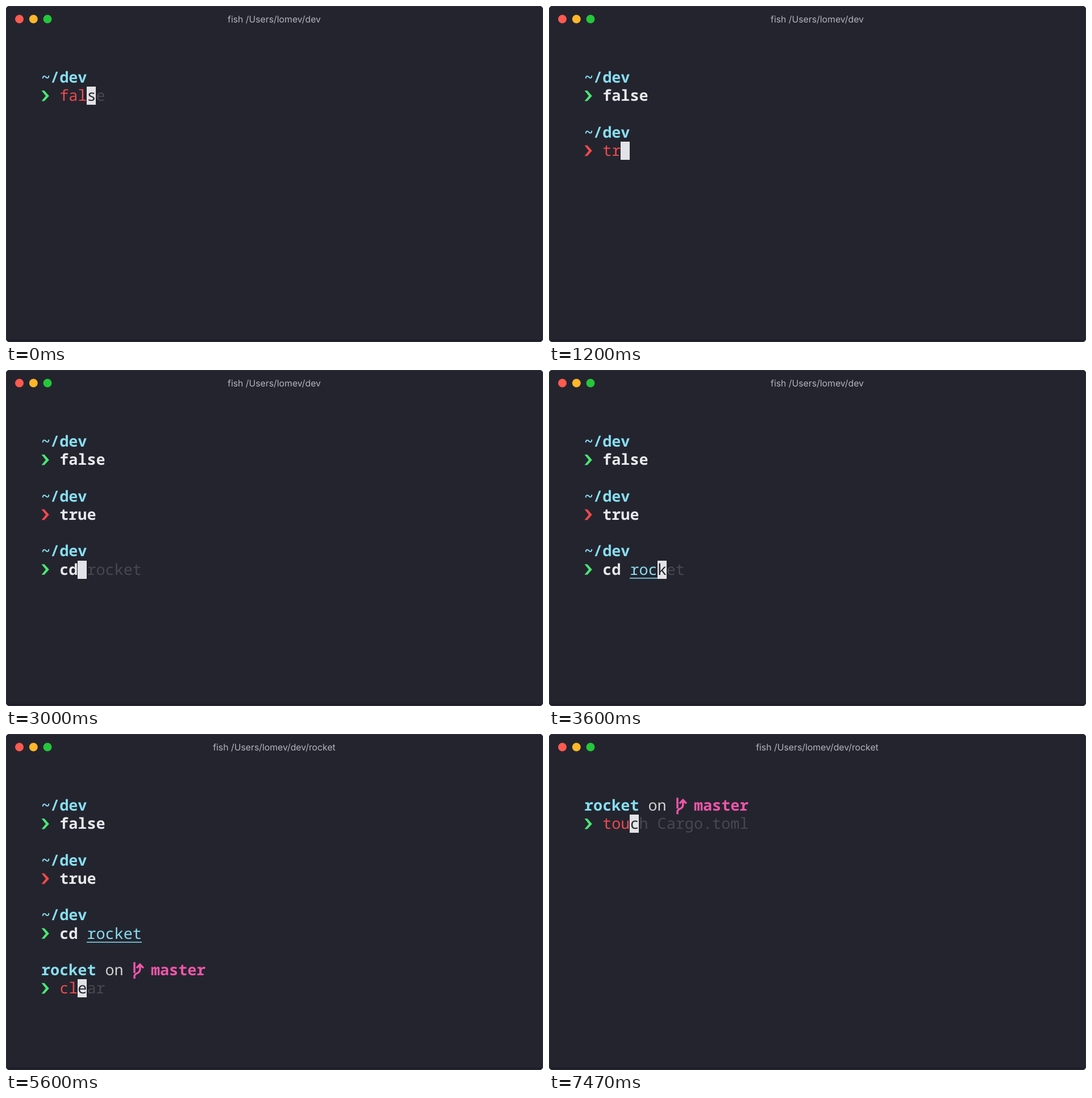
Write an HTML page that moves like this. It is 945 px wide and 592 px high and loops after 8 s.

```html
<!DOCTYPE html>
<html lang="en">
<head>
<meta charset="utf-8">
<title>Terminal prompt</title>
<style>
  html, body { margin: 0; width: 100%; height: 100%; overflow: hidden; background: #fff; }
  svg { display: block; width: 945px; height: 592px; }
  text { white-space: pre; text-rendering: geometricPrecision; }
  #screen text { font: 26.8px "Noto Sans Mono", monospace; }
  #title { font: 15.8px Inter, sans-serif; fill: #b4b4b8; text-anchor: middle; }
  #screen .dir, #screen .cmd, #screen .branch { font-weight: 650; }
  .dir, .arg { fill: #87dff0; }
  .cmd { fill: #e8e9eb; }
  .bad { fill: #ee4b4b; }
  .good { fill: #4be775; }
  .plain { fill: #d2d2d2; }
  .ghost { fill: #48484c; }
  .branch { fill: #f056a8; }
  .icon { fill: none; stroke: #f056a8; stroke-width: 3.5; }
  .cursor { fill: #e3e3e7; }
  .under { fill: #24242f; }
</style>
</head>
<body>
<svg viewBox="0 0 945 592">
  <rect width="945" height="592" rx="6" fill="#1d1d27"/>
  <path d="M0 588V6a6 6 0 0 1 6-6H939a6 6 0 0 1 6 6V588z" fill="#24242f"/>
  <rect x=".5" y=".5" width="944" height="591" rx="5.5" fill="none" stroke="#30313b"/>
  <circle cx="23.5" cy="23" r="7.5" fill="#ff5a50"/>
  <circle cx="48.3" cy="23" r="7.5" fill="#ffb729"/>
  <circle cx="73" cy="23" r="7.5" fill="#24c739"/>
  <text id="title" x="472" y="29"></text>
  <g id="screen"></g>
</svg>
<script>
const LOOP = 8000, CELL = 16.08, LINE = 32.2;
const CLEAR_AT = 6200, TITLE_AT = 4670;
const screen = document.getElementById('screen');
const title = document.getElementById('title');

const x = col => 62 + col * CELL;
const y = row => 110.2 + row * LINE;

// Input steps: [time, typed text, command style, suggestion, path underlined]
const rocketSteps = [...'rocket'].map((_, i) =>
  [3270 + i * 133, 'cd ' + 'rocket'.slice(0, i + 1), 'cmd', 'rocket'.slice(i + 1), true]);

const prompts = [
  { at: 0, until: CLEAR_AT, row: 0, mark: 'good', enter: 530, input: [
    [0, 'fal', 'bad', 'se'], [70, 'fals', 'bad', 'e'],
    [200, 'false', 'bad', ''], [270, 'false', 'cmd', '']] },
  { at: 600, until: CLEAR_AT, row: 3, mark: 'bad', enter: 2070, input: [
    [1000, 't', 'cmd', ''], [1070, 't', 'bad', 'ouch Cargo.toml'],
    [1200, 'tr', 'bad', ''], [1270, 'tr', 'bad', 'ue'],
    [1470, 'tru', 'bad', 'e'], [1670, 'true', 'bad', ''], [1730, 'true', 'cmd', '']] },
  { at: 2130, until: CLEAR_AT, row: 6, mark: 'good', input: [
    [2800, 'c', 'cmd', ''], [2870, 'c', 'bad', 'd rocket'],
    [2930, 'cd', 'bad', ' rocket'], [3000, 'cd', 'cmd', ' rocket'],
    [3130, 'cd ', 'cmd', 'rocket'], ...rocketSteps] },
  { at: 4330, until: CLEAR_AT, row: 9, mark: 'good', git: true, input: [
    [5400, 'c', 'cmd', ''], [5470, 'c', 'bad', 'd rocket'],
    [5530, 'cl', 'bad', ''], [5600, 'cl', 'bad', 'ear'],
    [5730, 'cle', 'bad', 'ar'], [5870, 'clea', 'bad', 'r'],
    [6000, 'clear', 'bad', ''], [6070, 'clear', 'cmd', '']] },
  { at: CLEAR_AT, until: LOOP, row: 0, mark: 'good', git: true, input: [
    [6800, 't', 'cmd', ''], [6870, 't', 'bad', 'rue'],
    [7130, 'to', 'bad', ''], [7200, 'to', 'bad', 'uch Cargo.toml'],
    [7470, 'tou', 'bad', 'ch Cargo.toml']] },
];

const label = (col, row, text, cls) =>
  text && `<text x="${x(col)}" y="${y(row) + 25}" class="${cls}">${text}</text>`;

// Boxes snap to whole pixels, as terminal cells do.
function box(col, row, cells, top, height, cls) {
  const left = Math.round(x(col)), right = Math.round(x(col + cells));
  return `<rect x="${left}" y="${Math.round(y(row) + top)}" width="${right - left}" height="${height}" class="${cls}"/>`;
}

const cursor = (col, row) => box(col, row, 1, 0, 32, 'cursor');

const chevron = (row, cls) =>
  `<path transform="translate(62 ${y(row)})" class="${cls}" d="M.5 6.6h5l8.3 9.4-8.3 9.2h-5L8 16z"/>`;

const branchIcon = row =>
  `<path transform="translate(${x(10)} ${y(row)})" class="icon"
    d="M3.2 2V21M3.2 31V27Q3.2 23.5 8 21.5T13 14.5V6M7 12.2l6-6.2 6 6.2"/>`;

function heading({ row, git }) {
  if (!git) return label(0, row, '~/dev', 'dir');
  return label(0, row, 'rocket', 'dir') + label(7, row, 'on', 'plain') +
    branchIcon(row) + label(12, row, 'master', 'branch');
}

function drawPrompt(prompt, t, active) {
  const row = prompt.row + 1;
  const [, typed, style, ghost, path] =
    prompt.input.findLast(step => step[0] <= t) || [0, '', 'cmd', ''];
  const [command, arg = ''] = typed.split(' ');
  const argCol = 3 + command.length, end = 2 + typed.length;
  const entered = t >= prompt.enter;

  let out = heading(prompt) + chevron(row, prompt.mark) +
    label(2, row, command, style) + label(argCol, row, arg, 'arg');
  if (path) out += box(argCol, row, arg.length, 30, 1.5, 'arg');
  if (!active) return out;
  if (entered) return out + cursor(0, row + 1);
  return out + cursor(end, row) +
    label(end, row, ghost.slice(0, 1), 'under') +
    label(end + 1, row, ghost.slice(1), 'ghost');
}

let lastMarkup;
function render() {
  const t = performance.now() % LOOP;
  const visible = prompts.filter(p => t >= p.at && t < p.until);
  const markup = visible.map((p, i) => drawPrompt(p, t, i === visible.length - 1)).join('');
  if (markup !== lastMarkup) screen.innerHTML = lastMarkup = markup;
  title.textContent = 'fish /Users/lomev/dev' + (t >= TITLE_AT ? '/rocket' : '');
  requestAnimationFrame(render);
}
render();
</script>
</body>
</html>
```
